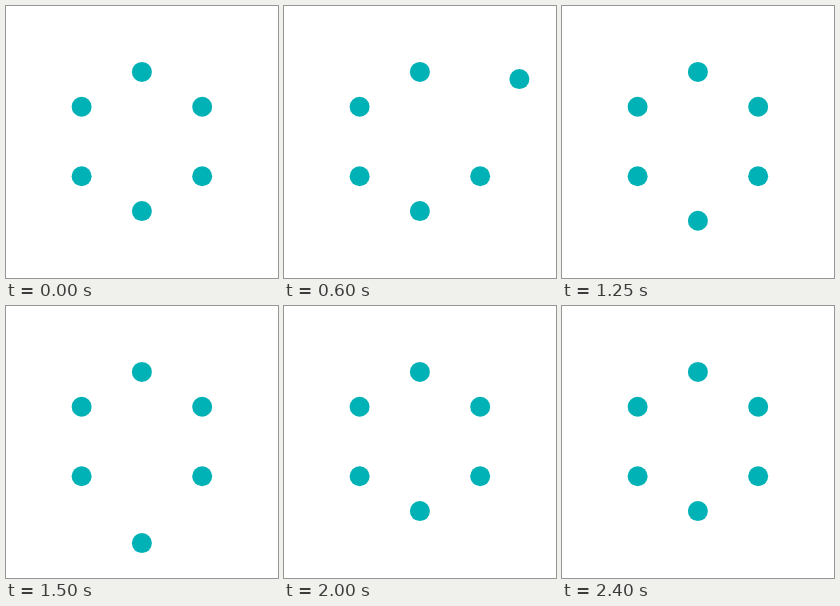
Animation of 272x272 px, one loop 2450 ms. Source, as an HTML page with a canvas:

```html
<!DOCTYPE html>
<html>
<head>
<meta charset="utf-8">
<title>Six dots</title>
<style>
  html, body { margin: 0; width: 100%; height: 100%; overflow: hidden; background: #fff; }
  canvas { display: block; }
</style>
</head>
<body>
<canvas id="stage" width="272" height="272"></canvas>
<script>
const ctx = document.getElementById('stage').getContext('2d');
const LOOP = 2450, STEP = 50, SLOT = 400, OUT = 250;
const CENTER = { x: 135.9, y: 135.5 }, RING = 69.6, DOT = 10;

// Farthest offset of each dot, clockwise from the top.
const reach = [[0, -45], [49, -34.5], [48, 33.5], [0, 48], [-54.5, 34], [-54.5, -34.5]];

// Linear way out, then a quicker linear way back.
function push(t) {
  if (t <= 0 || t >= SLOT) return 0;
  return t < OUT ? t / OUT : (SLOT - t) / (SLOT - OUT);
}

function draw(time) {
  ctx.clearRect(0, 0, 272, 272);
  ctx.fillStyle = '#00b2b6';
  reach.forEach(([dx, dy], i) => {
    const angle = (i * 60 - 90) * Math.PI / 180;
    const p = push(time - i * SLOT);
    ctx.beginPath();
    ctx.arc(CENTER.x + RING * Math.cos(angle) + dx * p,
            CENTER.y + RING * Math.sin(angle) + dy * p, DOT, 0, 2 * Math.PI);
    ctx.fill();
  });
}

const start = performance.now();
function tick() {
  // Half a display tick of lead keeps each step on time.
  const time = (performance.now() - start + 8) % LOOP;
  draw(Math.floor(time / STEP) * STEP);
  requestAnimationFrame(tick);
}
tick();
</script>
</body>
</html>
```
